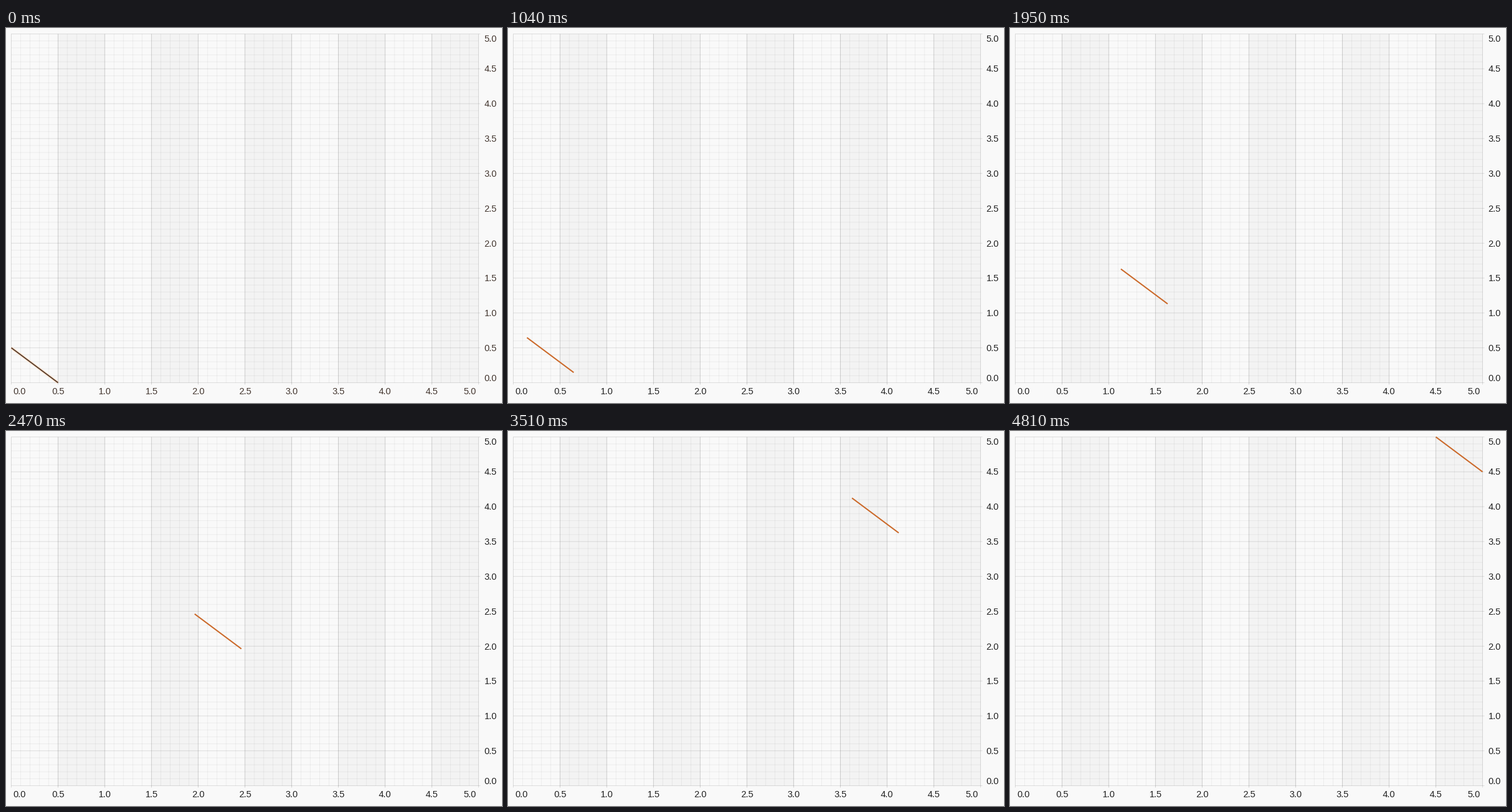
Recreate the animation shown at these times as a matplotlib script. Size 793 by 600 pixels, loop 5070 ms.

```python
import math

import matplotlib.pyplot as plt
from matplotlib.animation import FuncAnimation
from matplotlib.patches import Rectangle

W, H, DPI = 793, 600, 64
FRAMES, STEP = 39, 130
LEFT, RIGHT, TOP, BOTTOM = 8.5, 755.5, 9.5, 567.5
START, DURATION, TRAVEL = 560, 4160, 4.5
ORANGE, DARK = "#cb6828", "#4a2f20"


def pt(px):
    return px * 72 / DPI


def sx(v):
    return LEFT + v * (RIGHT - LEFT) / 5


def sy(v):
    return BOTTOM - v * (BOTTOM - TOP) / 5


fig = plt.figure(figsize=(W / DPI, H / DPI), dpi=DPI, facecolor="#f9f9f9")
ax = fig.add_axes([0, 0, 1, 1])
ax.set_xlim(0, W)
ax.set_ylim(H, 0)
ax.axis("off")


def rule(xs, ys, alpha):
    ax.plot(xs, ys, color="black", alpha=alpha, lw=pt(1), snap=False,
            solid_capstyle="butt", zorder=2)


def label(x, baseline, value):
    return ax.text(x, baseline, f"{value:.1f}", ha="center", va="baseline",
                   family="Liberation Sans", size=pt(14.5), color="#222222")


# Alternating column shading
for k in range(1, 10, 2):
    ax.add_patch(Rectangle((sx(k / 2), TOP), sx(0.5) - LEFT, BOTTOM - TOP,
                           fc="#f3f3f3", lw=0, zorder=1))

# Grid: minor lines every 0.1, major lines every 0.5 with short ticks
for i in range(51):
    x, y = sx(i / 10), sy(i / 10)
    if i % 5:
        rule([x, x], [TOP, BOTTOM], 0.05)
        rule([LEFT, RIGHT], [y, y], 0.05)
    else:
        rule([x, x], [TOP, BOTTOM + 3], 0.12 if i in (0, 50) else 0.17)
        rule([LEFT, RIGHT + 3], [y, y], 0.11)

labels = []
for k in range(11):
    v = k / 2
    x = {0: 22, 10: 742}.get(k, sx(v))
    base = {0: 565, 10: 22.3}.get(k, sy(v) + 5.2)
    labels += [label(x, 586, v), label(774.5, base, v)]

halo, = ax.plot([], [], color="#f6c9a0", alpha=0.55, lw=pt(4),
                solid_capstyle="butt", zorder=3)
line, = ax.plot([], [], lw=pt(2), solid_capstyle="butt", zorder=4)


def offset(ms):
    p = min(max((ms - START) / DURATION, 0), 1)
    return TRAVEL * (1 - math.cos(math.pi * p)) / 2


def update(i):
    ms = i * STEP
    d = offset(ms)
    resting = ms < START
    xs, ys = [sx(d), sx(d + 0.5)], [sy(d + 0.5), sy(d)]
    line.set_data(xs, ys)
    line.set_color(DARK if resting else ORANGE)
    line.set_linewidth(pt(1.6 if resting else 2))
    halo.set_data(xs, ys)
    halo.set_visible(resting)
    for t in labels:
        t.set_color("#43362f" if resting else "#222222")
    return [line, halo, *labels]


anim = FuncAnimation(fig, update, frames=FRAMES, interval=STEP,
                     repeat=True, repeat_delay=0, blit=False)
plt.show()
```
